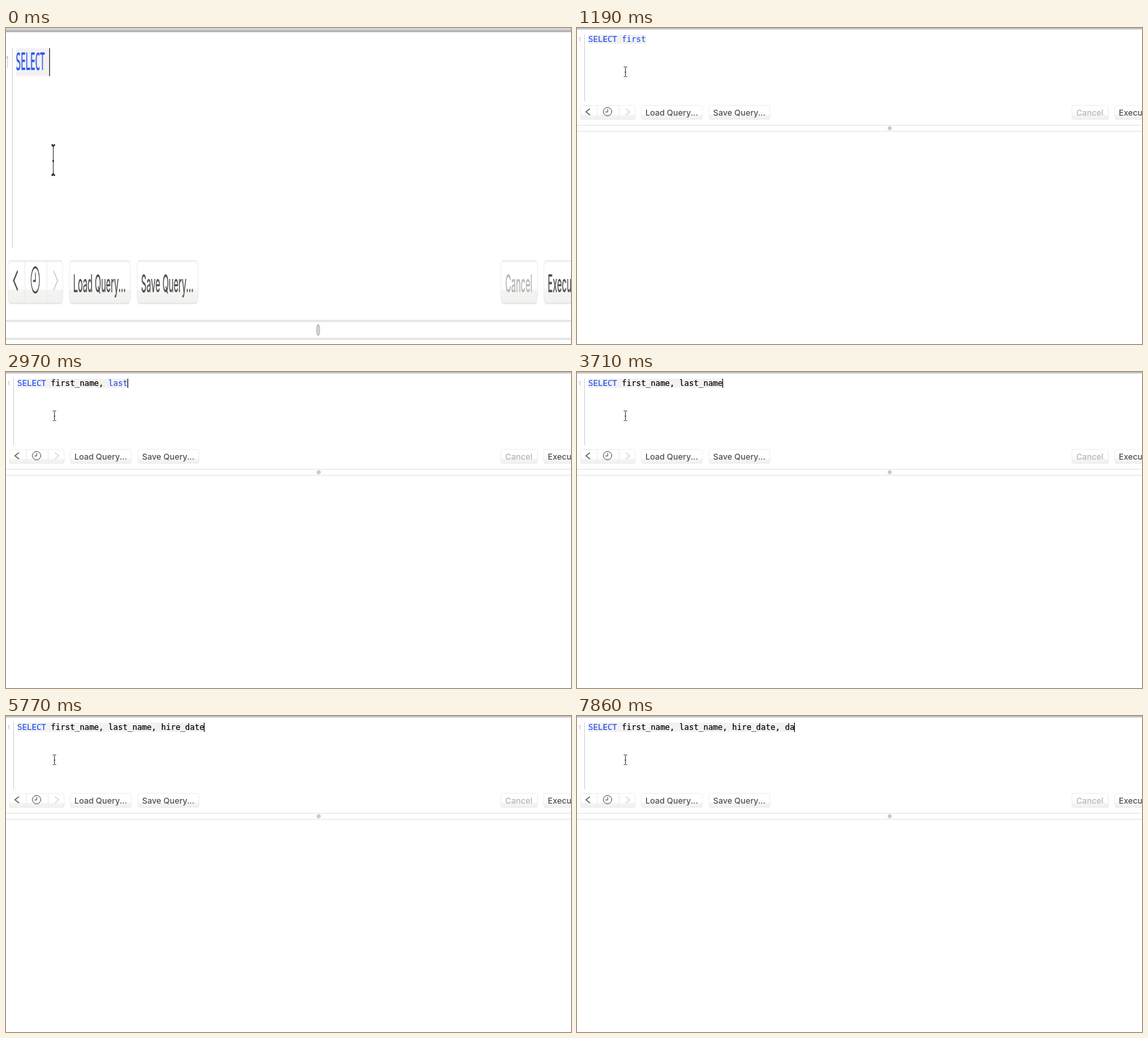
Recreate the animation shown at these times as an HTML page. Size 851x476 px, loop 8000 ms.

```html
<!DOCTYPE html>
<html lang="en">
<head>
<meta charset="utf-8">
<title>Query editor</title>
<style>
html, body { margin: 0; width: 100%; height: 100%; overflow: hidden; background: #fff; }
svg { display: block; width: 851px; height: 476px; }
.ui { font: 500 12.3px Inter, Roboto, sans-serif; fill: #505050; }
.code { font: 12px "DejaVu Sans Mono", monospace; white-space: pre; fill: #000; stroke: #000; stroke-width: .2px; }
.code .key { fill: #2a55f5; stroke: #2a55f5; }
.num { font: 8px Inter, sans-serif; fill: #b5b5b5; }
</style>
</head>
<body>
<svg viewBox="0 0 851 476">
  <defs>
    <linearGradient id="shade" x1="0" y1="0" x2="0" y2="1">
      <stop offset="0.66" stop-color="#fff"/>
      <stop offset="0.7" stop-color="#f4f4f3"/>
      <stop offset="1" stop-color="#f1f1f0"/>
    </linearGradient>
  </defs>
  <rect width="851" height="476" fill="#fff"/>
  <g id="view">
    <rect x="-5" width="870" height="1" fill="#d0d0d0"/>
    <rect x="-5" y="1" width="870" height="1" fill="#b0b0b0"/>
    <text class="num" x="2.3" y="20">1</text>
    <rect x="11" y="10" width="1" height="100" fill="#d0d0d0"/>
    <rect id="band" x="17" y="10" height="14" fill="#f3f2f1"/>
    <text id="code" class="code" x="17" y="20.8"></text>
    <rect id="caret" y="10" width="1" height="14" fill="#000"/>
    <path d="M70.5 58.5h1.5l1 1 1-1h1.5M73 59.5v13M70.5 73.5h1.5l1-1 1 1h1.5M72 66.5h2" fill="none" stroke="#111" stroke-width=".9"/>
    <g id="buttons"></g>
    <path d="M30.5 117v20M63.5 117v20" stroke="#ebebeb"/>
    <g fill="none" stroke="#484848" stroke-width="1.3">
      <path id="arrow" d="M19.5 121.5 13.5 126.3 19.5 131.1"/>
      <path d="M73.5 121.5 79.5 126.3 73.5 131.1" stroke="#d2d2d2"/>
      <circle cx="46" cy="126" r="6.3" stroke-width="1"/>
      <path d="M46.2 122.3v4.2h-3.4" stroke-width="1"/>
    </g>
    <g class="ui">
      <text x="103" y="132">Load Query...</text>
      <text x="205" y="132">Save Query...</text>
      <text x="752" y="132" fill="#b4b4b4">Cancel</text>
      <text x="816" y="132">Execute</text>
    </g>
    <path d="M-5 146.5H865M-5 155.5H865" stroke="#e4e4e4"/>
    <circle cx="471" cy="151" r="2.6" fill="#cfcfcf" stroke="#bbb" stroke-width=".8"/>
  </g>
</svg>
<script>
const $ = id => document.getElementById(id);
const LOOP = 8000, LEFT = 17, CHAR = 7.224, BLINK = 600;

// each burst is typed evenly between its two times
const bursts = [
  { text: "SELECT ", from: -1, to: 0 },
  { text: "first", from: 150, to: 590 },
  { text: "_name, ", from: 1490, to: 2080 },
  { text: "last", from: 2680, to: 2970 },
  { text: "_name, ", from: 3260, to: 4150 },
  { text: "hire", from: 4590, to: 4880 },
  { text: "_date", from: 5330, to: 5770 },
  { text: ", ", from: 6070, to: 6220 },
  { text: "da", from: 7710, to: 7860 }
];

function typed({ text, from, to }, t) {
  if (t < from) return "";
  const part = Math.min(1, (t - from) / (to - from));
  return text.slice(0, 1 + Math.ceil((text.length - 1) * part));
}

// the caret blinks once the typing has rested
function caretOn(t) {
  const rest = t - Math.max(...bursts.filter(b => b.from <= t).map(b => Math.min(b.to, t)));
  return Math.floor(rest / BLINK) % 2 === 0;
}

const button = (x, w) =>
  `<rect x="${x}" y="117" width="${w}" height="21" rx="3.5" fill="#d6d6d6"/>
   <rect x="${x}" y="116.5" width="${w}" height="21" rx="3.5" fill="url(#shade)" stroke="#ececec" stroke-width=".8"/>`;
$("buttons").innerHTML = button(5, 82.5) + button(97, 92) + button(199, 91.5)
  + button(745.5, 55) + button(810, 80);

const paint = text => text.replace(/\b(SELECT|first|last)\b/g, '<tspan class="key">$1</tspan>');

let shown = "";
function draw(t) {
  const text = bursts.map(b => typed(b, t)).join("");
  const width = text.length * CHAR;
  if (text !== shown) $("code").innerHTML = paint(shown = text);
  $("band").setAttribute("width", width);
  $("caret").setAttribute("x", Math.round(LEFT + width - 0.6));
  $("caret").setAttribute("visibility", caretOn(t) ? "visible" : "hidden");
  // the view opens tall, then snaps to its normal size
  $("view").setAttribute("transform", t < 150 ? "matrix(1.0025 0 0 3.01 -2 0.3)" : "");
}

const start = performance.now();
function tick() {
  draw((performance.now() - start) % LOOP);
  requestAnimationFrame(tick);
}
draw(0);
requestAnimationFrame(tick);
</script>
</body>
</html>
```
